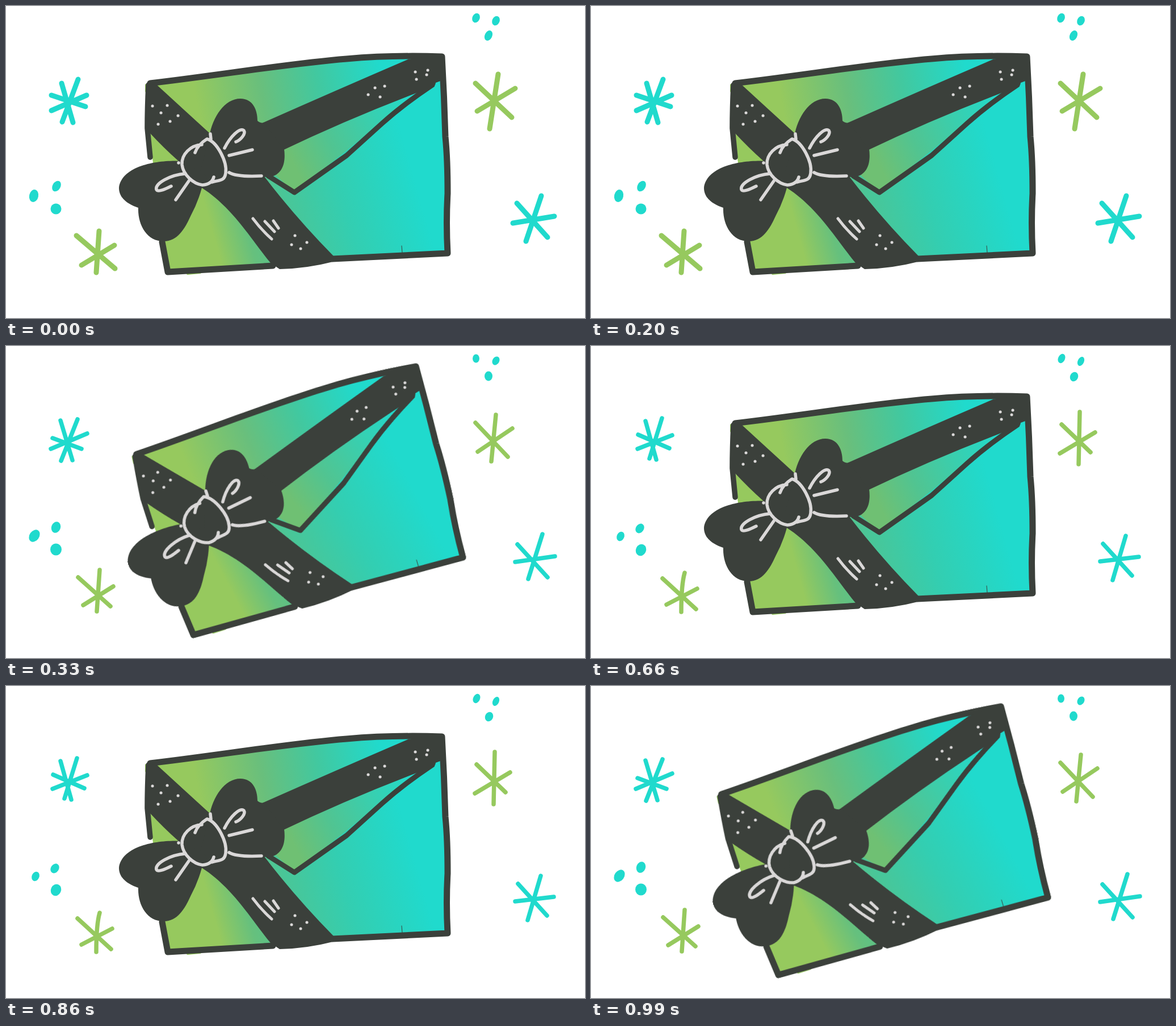
Animation, 1020 px wide and 549 px high, one loop 1.32 s. Source, as an HTML page without scripts:

```html
<!DOCTYPE html>
<html lang="en">
<head>
<meta charset="utf-8">
<title>Gift envelope</title>
<style>
  html, body { margin: 0; width: 100%; height: 100%; overflow: hidden; background: #fff; }
  svg { display: block; width: 100%; height: 100%; }
  path { fill: none; stroke-linecap: round; stroke-linejoin: round; }
  .cyan { stroke: #20dacd; }
  .green { stroke: #96c95e; }
  .dots { fill: #20dacd; }
  .dark { fill: #3b403b; }
  .line { stroke: #3b403b; }
  .chalk { stroke: #dad8d8; }

  /* Envelope rocks between two poses */
  .envelope { transform-origin: 521.5px 282px; animation: rock 660ms step-end infinite; }
  @keyframes rock {
    50% { transform: translate(.5px, -5.3px) rotate(-12.2deg); }
  }

  /* Sparkles cycle a, b, c, b */
  .a, .b, .c { visibility: hidden; animation: 1320ms step-end infinite; }
  .a { animation-name: show-a; stroke-width: 9; }
  .b { animation-name: show-b; stroke-width: 7.5; }
  .c { animation-name: show-c; stroke-width: 7.5; }
  @keyframes show-a { 0% { visibility: visible; } 25% { visibility: hidden; } }
  @keyframes show-b {
    0%, 50% { visibility: hidden; }
    25%, 75% { visibility: visible; }
  }
  @keyframes show-c { 50% { visibility: visible; } 75% { visibility: hidden; } }
</style>
</head>
<body>
<svg viewBox="0 0 1020 549">
  <defs>
    <linearGradient id="body" gradientUnits="userSpaceOnUse" x1="370" y1="420" x2="725" y2="320">
      <stop offset="0" stop-color="#96c95e"/>
      <stop offset=".16" stop-color="#66c07d"/>
      <stop offset=".38" stop-color="#49c698"/>
      <stop offset=".64" stop-color="#33ceb1"/>
      <stop offset="1" stop-color="#20dacd"/>
    </linearGradient>
    <linearGradient id="top" gradientUnits="userSpaceOnUse" x1="335" y1="165" x2="660" y2="105">
      <stop offset="0" stop-color="#96c95e"/>
      <stop offset=".35" stop-color="#69bf7c"/>
      <stop offset=".65" stop-color="#42c89f"/>
      <stop offset="1" stop-color="#20dacd"/>
    </linearGradient>
    <linearGradient id="flap" gradientUnits="userSpaceOnUse" x1="505" y1="275" x2="725" y2="165">
      <stop offset="0" stop-color="#6fc073"/>
      <stop offset=".3" stop-color="#51c491"/>
      <stop offset="1" stop-color="#20dacd"/>
    </linearGradient>
  </defs>

  <g class="a">
    <path class="cyan" d="M98 136L118 205M127 129L99 204M142 157L80 184M80 157L140 177"/>
    <path class="cyan" d="M900 347L954 407M943 334L916 414M966 370L893 382"/>
    <path class="green" d="M827 136L891 196M867 120L852 216M897 145L830 185"/>
    <path class="green" d="M124 404L192 462M164 396L159 469M191 421L133 456"/>
    <g class="dots">
      <ellipse cx="828" cy="21" rx="6.5" ry="8.5" transform="rotate(25 828 21)"/>
      <ellipse cx="863" cy="26" rx="6.5" ry="8.5" transform="rotate(25 863 26)"/>
      <ellipse cx="850" cy="52" rx="6.5" ry="9.5" transform="rotate(25 850 52)"/>
      <ellipse cx="49" cy="334" rx="8" ry="11" transform="rotate(12 49 334)"/>
      <ellipse cx="89" cy="317" rx="7" ry="10" transform="rotate(30 89 317)"/>
      <ellipse cx="88" cy="357" rx="9.5" ry="9.5"/>
    </g>
  </g>

  <g class="b">
    <path class="cyan" d="M96 131L117 201M126 129L97 202M143 154L79 181M82 162L133 181"/>
    <path class="cyan" d="M901 349L954 407M945 331L920 410M967 370L897 380"/>
    <path class="green" d="M827 135L884 195M863 121L855 203M892 145L831 186"/>
    <path class="green" d="M127 407L184 458M165 394L160 467M189 423L136 456"/>
    <g class="dots">
      <ellipse cx="828" cy="22" rx="6" ry="7.5"/>
      <ellipse cx="863" cy="26" rx="6" ry="8" transform="rotate(30 863 26)"/>
      <ellipse cx="850" cy="53" rx="7" ry="8.5"/>
      <ellipse cx="50" cy="334" rx="8.5" ry="11.5" transform="rotate(35 50 334)"/>
      <ellipse cx="88" cy="319" rx="8" ry="10" transform="rotate(20 88 319)"/>
      <ellipse cx="88" cy="358" rx="10" ry="10.5"/>
    </g>
  </g>

  <g class="c">
    <path class="cyan" d="M96 132L115 200M125 127L103 198M143 157L82 181M83 156L138 180"/>
    <path class="cyan" d="M902 348L953 404M942 334L919 412M965 371L897 379"/>
    <path class="green" d="M829 138L880 187M861 116L859 208M888 152L826 189"/>
    <path class="green" d="M126 409L185 463M165 399Q159 420 159 468M187 427L133 455"/>
    <g class="dots">
      <ellipse cx="829" cy="22" rx="6" ry="8.5" transform="rotate(25 829 22)"/>
      <ellipse cx="863" cy="27" rx="5.5" ry="8.5" transform="rotate(25 863 27)"/>
      <ellipse cx="851" cy="54" rx="7" ry="8.5" transform="rotate(25 851 54)"/>
      <ellipse cx="52" cy="335" rx="6.5" ry="8.5" transform="rotate(25 52 335)"/>
      <ellipse cx="86" cy="321" rx="7" ry="9" transform="rotate(35 86 321)"/>
      <ellipse cx="88" cy="359" rx="9" ry="10.5" transform="rotate(25 88 359)"/>
    </g>
  </g>

  <g class="envelope">
    <path class="green" stroke-width="4" d="M320 471L342 469M247 139V150"/>
    <path style="fill:url(#body)" d="M251 136Q253 220 258 268L276 415L285 468L470 457L780 436L771 87Q500 97 251 136Z"/>
    <path style="fill:url(#top)" d="M251 136Q500 97 771 87L450 210L360 240Z"/>
    <path style="fill:url(#flap)" d="M440 265L755 130L508 328Z"/>

    <!-- Outline and flap edge -->
    <path class="line" stroke-width="11" d="M254 136C380 121 500 101 600 93Q680 86 768 89Q772 160 774 230Q778 270 778 330Q775 380 778 435L575 445M470 457L285 468L275 415"/>
    <path class="line" stroke-width="9.5" d="M251 139Q249 180 249 215L254 266"/>
    <path class="line" stroke-width="9" d="M751 139Q700 173 662 207L600 263L508 328L462 299"/>

    <!-- Ribbons -->
    <path class="dark" style="fill:#3b403b" d="M249 136L267 140Q315 184 360 225L455 300Q510 372 577 440L576 450Q530 462 482 463L466 452C435 415 400 355 345 320L303 272Q278 250 252 222L246 214Z"/>
    <path style="fill:#3b403b" d="M440 211Q580 149 708 94L770 84L768 131L757 135Q757 141 747 144Q610 195 485 255Z"/>

    <!-- Bow -->
    <path style="fill:#3b403b" d="M358 230C364 195 385 163 413 163C435 163 443 183 443 202Q447 206 455 206L490 252C493 275 488 297 464 301L390 299L340 300Z"/>
    <path style="fill:#3b403b" d="M312 273C270 270 204 280 199 320C199 340 218 350 233 355C232 385 248 414 278 414C302 414 315 392 325 370Q338 346 345 320L355 300Z"/>

    <g class="chalk">
      <path stroke-width="5.5" d="M360 225L361 234M333 258Q338 244 354 234C372 239 390 274 387 294C385 309 375 306 363 310M345 244C325 245 309 261 310 279C312 297 330 313 346 315C358 314 364 309 366 301"/>
      <path stroke-width="5.5" d="M385 250C395 230 412 213 419 219C423 225 413 236 405 239M393 263L434 253M393 293C405 300 430 300 450 299"/>
      <path stroke-width="5.5" d="M316 295C290 297 262 312 265 323C268 329 285 320 291 317M322 308L299 341M304 276h.1"/>
      <path stroke-width="5" d="M435 374Q450 394 468 410M456 379L473 397M471 378L480 391"/>
      <path stroke-width="5" d="M258 176h.1M284 175h.1M273 188h.1M303 193h.1M289 203h.1M268 208h.1"/>
      <path stroke-width="5" d="M721 116h.1M743 113h.1M741 121h.1M723 129h.1M650 144h.1M667 141h.1M638 156h.1M659 160h.1"/>
      <path stroke-width="5" d="M509 404h.1M530 416h.1M503 420h.1M519 427h.1"/>
    </g>
    <path class="line" stroke-width="1" d="M697 422L698 434"/>
  </g>
</svg>
</body>
</html>
```
